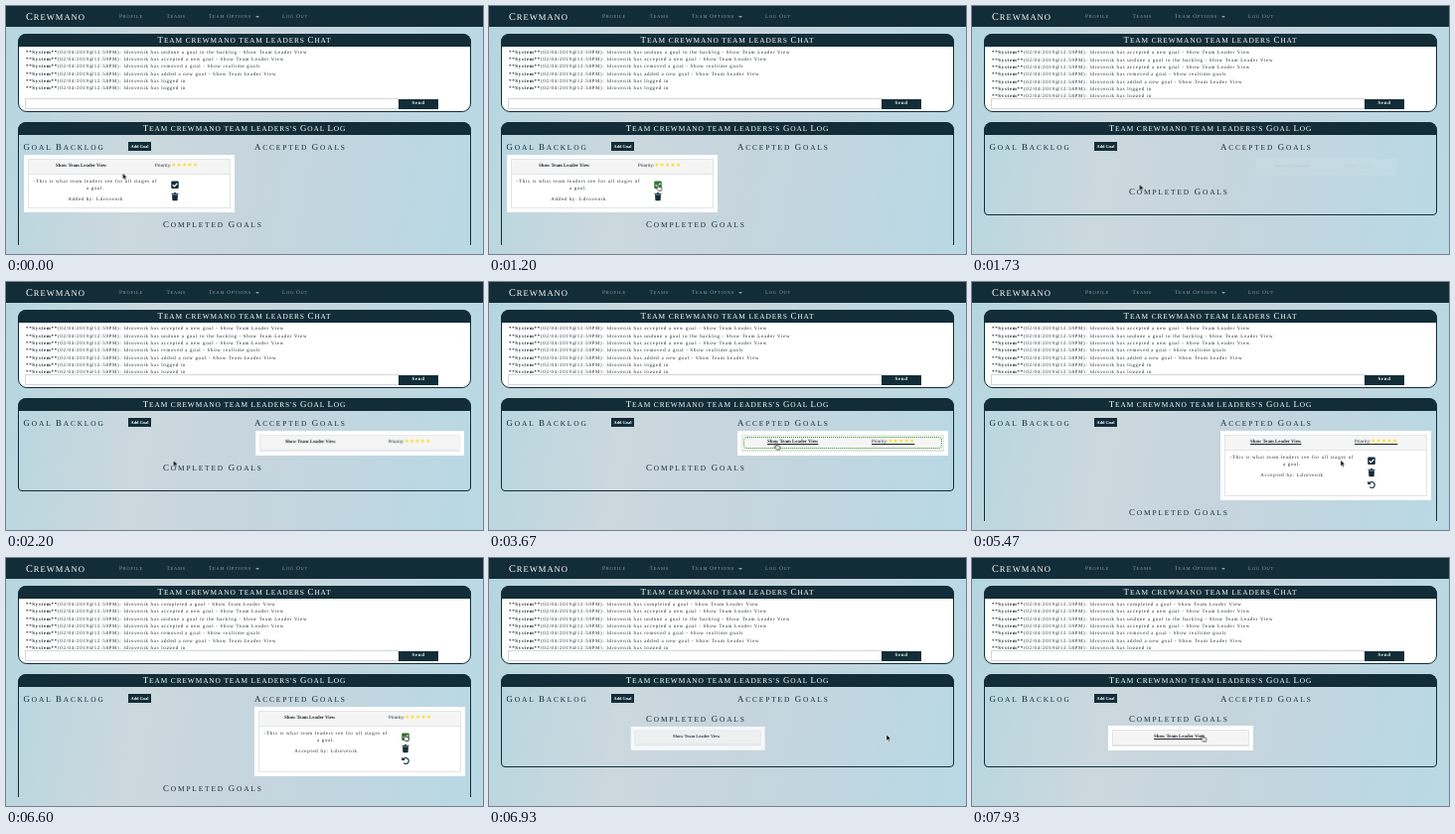
These frames come from a looping animation (480x250 px, 8000 ms). An HTML page:

```html
<!DOCTYPE html>
<html lang="en">
<head>
<meta charset="utf-8">
<title>Team goals</title>
<style>
  :root { --ink: #122d37; --loop: 8s infinite; }
  * { box-sizing: border-box; }
  html, body { margin: 0; width: 100%; height: 100%; overflow: hidden; }
  body {
    position: relative;
    font: 4.87px/8px "Liberation Serif", serif;
    color: #1d2529;
    text-rendering: geometricPrecision;
    background: linear-gradient(100deg, #b5d6df, #cbd8de 30%, #c6d5dd 55%, #b8d9e5);
  }
  div, nav, section, svg, h1, h2, .at { position: absolute; white-space: nowrap; }
  .view { inset: 0 0 auto; height: 241px; overflow: hidden; }

  /* large and small capitals */
  .caps { margin: 0; font-weight: 400; text-transform: uppercase; line-height: 10px; }
  .caps b { font-size: 1.2em; font-weight: 400; }

  nav { inset: 0 0 auto; height: 21px; background: var(--ink); color: #929da1; }
  nav .caps { top: 5.5px; font-size: 4.5px; letter-spacing: .74px; }
  nav .brand { left: 20px; font-size: 8.6px; letter-spacing: .96px; color: #fff; }
  .caret { left: 250.5px; top: 9.5px; border: solid transparent; border-width: 2px 2px 0; border-top-color: #929da1; }

  .panel { left: 12px; width: 456px; border: 1px solid var(--ink); }
  .panel h1 {
    inset: -1px -1px auto; height: 13px; border-radius: 8px 8px 0 0;
    background: var(--ink); color: #fff; text-align: center;
    font-size: 7.4px; line-height: 13px; letter-spacing: .88px;
  }
  .chat { top: 28px; height: 79px; border-radius: 9px; background: #fff; }
  .log { top: 117px; border-radius: 9px 9px 4px 4px; animation: log var(--loop); }
  .feed { left: 20px; top: 43px; width: 430px; height: 49px; overflow: hidden; }
  .lines { top: .8px; line-height: 7.36px; letter-spacing: .73px; animation: feed var(--loop) step-end; }
  .entry { left: 19px; top: 93px; width: 377px; height: 11px; border: 1px solid #d3d7d9; }
  .btn { background: var(--ink); color: #fff; font-weight: 700; text-align: center; }
  .send { left: 395px; top: 94px; width: 40px; height: 10px; line-height: 10px; letter-spacing: .73px; }
  .add { left: 123px; top: 137px; width: 23px; height: 9px; font-size: 4.35px; line-height: 9px; }

  h2.caps { top: 137px; font-size: 7.4px; letter-spacing: 1.85px; color: var(--ink); }
  h2.done { left: 158px; top: 182px; animation: done var(--loop); }

  .card { width: 212px; padding: 4px; background: #fff; }
  .in { position: relative; border: 1px solid #e2e4e5; }
  .head { position: relative; height: 15px; background: #f5f5f5; border-bottom: 1px solid #e2e4e5; }
  .head .at { top: 2.7px; }
  .head b.at { left: var(--name); }
  .head span.at { left: var(--rate); }
  .head i {
    font: 5.7px/1 "DejaVu Sans", sans-serif; letter-spacing: .32px; color: #fbdc1c;
  }
  .body { position: relative; height: 33px; overflow: hidden; }
  .body p { position: absolute; margin: 0; left: 0; width: 134px; text-align: center; letter-spacing: .73px; line-height: 7.2px; }
  .body svg { left: 142.5px; width: 8px; height: 8.5px; color: var(--ink); }
  .tick { top: 6px; animation: tick var(--loop) step-end; }
  .bin { top: 18px; }
  .undo { top: 30.4px; }

  .backlog { left: 18px; top: 150px; --name: 27px; --rate: 127px; animation: backlog var(--loop) step-end; }
  .accepted { left: 250px; top: 149.5px; --name: 25px; --rate: 130px; animation: pop var(--loop), accepted var(--loop) step-end; }
  .accepted .body { animation: open var(--loop); }
  .accepted .head .at { animation: focus var(--loop) step-end; }
  .completed { left: 137px; top: 169px; width: 146px; --name: 41px; animation: pop var(--loop) -3s, completed var(--loop) step-end; }
  .completed .head .at { animation: hover var(--loop) step-end; }
  .ring { inset: 1px 1px 1px; border: 1.4px dotted #2c961f; border-radius: 4px; animation: ring var(--loop) step-end; }

  .mouse { left: 0; top: 0; animation: move var(--loop) ease-in-out; }
  .mouse svg { left: -1px; top: -1px; width: 9px; height: 10px; }
  .arrow { animation: arrow var(--loop) step-end; }
  .hand { animation: hand var(--loop) step-end; }

  @keyframes feed {
    0% { transform: translateY(-14.72px); }
    20.8% { transform: translateY(-7.36px); }
    82.45% { transform: none; }
  }
  @keyframes log {
    0%, 20.8% { height: 127px; }
    20.81%, 48.25% { height: 94px; }
    52.9%, 83.2% { height: 139px; }
    83.21%, 100% { height: 94px; }
  }
  @keyframes done {
    0%, 20.8% { transform: translateY(33px); }
    20.81%, 48.25% { transform: none; }
    52.9%, 83.2% { transform: translateY(45px); }
    83.21%, 100% { transform: translateY(-25.5px); }
  }
  @keyframes open {
    0%, 48.25% { height: 0; }
    52.9%, 100% { height: 45px; }
  }
  @keyframes pop {
    0%, 21.125%, 23%, 24.875%, 26.75%, 28.625% { animation-timing-function: cubic-bezier(.215, .61, .355, 1); }
    0%, 21.125% { opacity: 0; transform: scale(.3); }
    23% { transform: scale(1.1); }
    24.875% { transform: scale(.9); }
    26.75% { opacity: 1; transform: scale(1.03); }
    28.625% { transform: scale(.97); }
    30.5%, 100% { opacity: 1; transform: none; }
  }
  @keyframes backlog { 0% { visibility: visible; } 20.8%, 100% { visibility: hidden; } }
  @keyframes accepted { 0% { visibility: hidden; } 21% { visibility: visible; } 83.2%, 100% { visibility: hidden; } }
  @keyframes completed { 0% { visibility: hidden; } 83.3%, 100% { visibility: visible; } }
  @keyframes focus {
    0% { text-decoration-line: none; }
    38.5% { text-decoration-line: underline; }
    79.1%, 100% { text-decoration-line: none; }
  }
  @keyframes hover { 0% { text-decoration-line: none; } 94.2%, 100% { text-decoration-line: underline; } }
  @keyframes ring { 0% { opacity: 0; } 45% { opacity: 1; } 47.4%, 100% { opacity: 0; } }
  @keyframes tick {
    0%, 20.8%, 83.2%, 100% { color: var(--ink); }
    6%, 70.8% { color: #2f7a2b; }
  }
  @keyframes arrow {
    0%, 20.8%, 59.5%, 83.2% { opacity: 1; }
    6%, 38.5%, 70.8%, 94.2%, 100% { opacity: 0; }
  }
  @keyframes hand {
    0%, 20.8%, 59.5%, 83.2% { opacity: 0; }
    6%, 38.5%, 70.8%, 94.2%, 100% { opacity: 1; }
  }
  @keyframes move {
    0%, .9% { transform: translate(117.5px, 168.5px); }
    2.4% { transform: translate(113px, 162.5px); }
    7.5%, 30.4% { transform: translate(168.5px, 179.7px); }
    40%, 57.5% { transform: translate(287.5px, 162.5px); }
    67.5%, 68.4% { transform: translate(371px, 179.5px); }
    71.6%, 90% { transform: translate(400px, 178px); }
    96.6%, 98.4% { transform: translate(228px, 178.5px); }
    99.1%, 100% { transform: translate(230.5px, 178.5px); }
  }
</style>
</head>
<body>
<svg width="0" height="0">
  <symbol id="tick" viewBox="0 0 16 17">
    <rect x=".5" y="1" width="15" height="15" rx="2" fill="currentColor"/>
    <path d="M3.5 8.5l3.3 3.3 6-6.3" fill="none" stroke="#fff" stroke-width="2.2"/>
  </symbol>
  <symbol id="bin" viewBox="0 0 16 17">
    <path d="M1 1.5h4.500l1-1.500h3l1 1.500H15v2H1zM2 4.500h12l-.8 11q-.1 1.500-1.500 1.500H4.300q-1.400 0-1.500-1.500z" fill="currentColor"/>
  </symbol>
  <symbol id="undo" viewBox="0 0 16 17">
    <path d="M3 6.500a6 6 0 1 1 1.300 6.800" fill="none" stroke="currentColor" stroke-width="2.300"/>
    <path d="M.5 1v7h7z" fill="currentColor"/>
  </symbol>
</svg>

<div class="view">
  <nav>
    <span class="at caps brand"><b>C</b>rewmano</span>
    <span class="at caps" style="left:114px"><b>P</b>rofile</span>
    <span class="at caps" style="left:161.5px"><b>T</b>eams</span>
    <span class="at caps" style="left:204px"><b>T</b>eam <b>O</b>ptions</span>
    <div class="caret"></div>
    <span class="at caps" style="left:278px"><b>L</b>og <b>O</b>ut</span>
  </nav>

  <section class="panel chat">
    <h1 class="caps"><b>T</b>eam crewmano team leaders <b>C</b>hat</h1>
  </section>
  <div class="feed"><div class="lines"></div></div>
  <div class="entry"></div>
  <div class="btn send">Send</div>

  <section class="panel log">
    <h1 class="caps"><b>T</b>eam crewmano team leaders's <b>G</b>oal <b>L</b>og</h1>
  </section>
  <h2 class="caps" style="left:17.5px"><b>G</b>oal <b>B</b>acklog</h2>
  <div class="btn add">Add Goal</div>
  <h2 class="caps" style="left:250px"><b>A</b>ccepted <b>G</b>oals</h2>
  <h2 class="caps done"><b>C</b>ompleted <b>G</b>oals</h2>

  <div class="card backlog"><div class="in">
    <div class="head"><b class="at">Show Team Leader View</b><span class="at">Priority:<i>★★★★★</i></span></div>
    <div class="body">
      <p style="top:3.7px">-This is what team leaders see for all stages of<br>a goal.</p>
      <p style="top:21.600px">Added by: Ldrovenik</p>
      <svg class="tick"><use href="#tick"/></svg>
      <svg class="bin"><use href="#bin"/></svg>
    </div>
  </div></div>

  <div class="card accepted"><div class="in">
    <div class="head"><b class="at">Show Team Leader View</b><span class="at">Priority:<i>★★★★★</i></span><div class="ring"></div></div>
    <div class="body">
      <p style="top:4px">-This is what team leaders see for all stages of<br>a goal.</p>
      <p style="top:22px">Accepted by: Ldrovenik</p>
      <svg class="tick"><use href="#tick"/></svg>
      <svg class="bin"><use href="#bin"/></svg>
      <svg class="undo"><use href="#undo"/></svg>
    </div>
  </div></div>

  <div class="card completed"><div class="in">
    <div class="head"><b class="at">Show Team Leader View</b></div>
  </div></div>

  <div class="mouse">
    <svg class="arrow" viewBox="-1 -1 9 10">
      <path d="M0 0v6.200l1.500-1.300 1 2.300 1-.4-1-2.300h2z" fill="#000" stroke="#fff" stroke-width=".5"/>
    </svg>
    <svg class="hand" viewBox="-1 -1 9 10">
      <path d="M1 .3q.8-.6 1.200.3v1.800l2.400.5q.8.2.7 1L4.900 6.500H2L-.3 3.900q.4-.8 1.300 0z" fill="#fff" stroke="#111" stroke-width=".7"/>
    </svg>
  </div>
</div>

<script>
  const view = "Show Team Leader View";
  const events = [
    [59, "has completed a goal - " + view],
    [59, "has accepted a new goal - " + view],
    [59, "has undone a goal to the backlog - " + view],
    [59, "has accepted a new goal - " + view],
    [58, "has removed a goal - Show realtime goals"],
    [58, "has added a new goal - " + view],
    [58, "has logged in"],
    [58, "has logged in"],
  ];
  document.querySelector(".lines").innerHTML = events
    .map(([min, text]) => `<b>**System**</b>(02/04/2019@12:${min}PM): ldrovenik ${text}`)
    .join("<br>");
</script>
</body>
</html>
```
